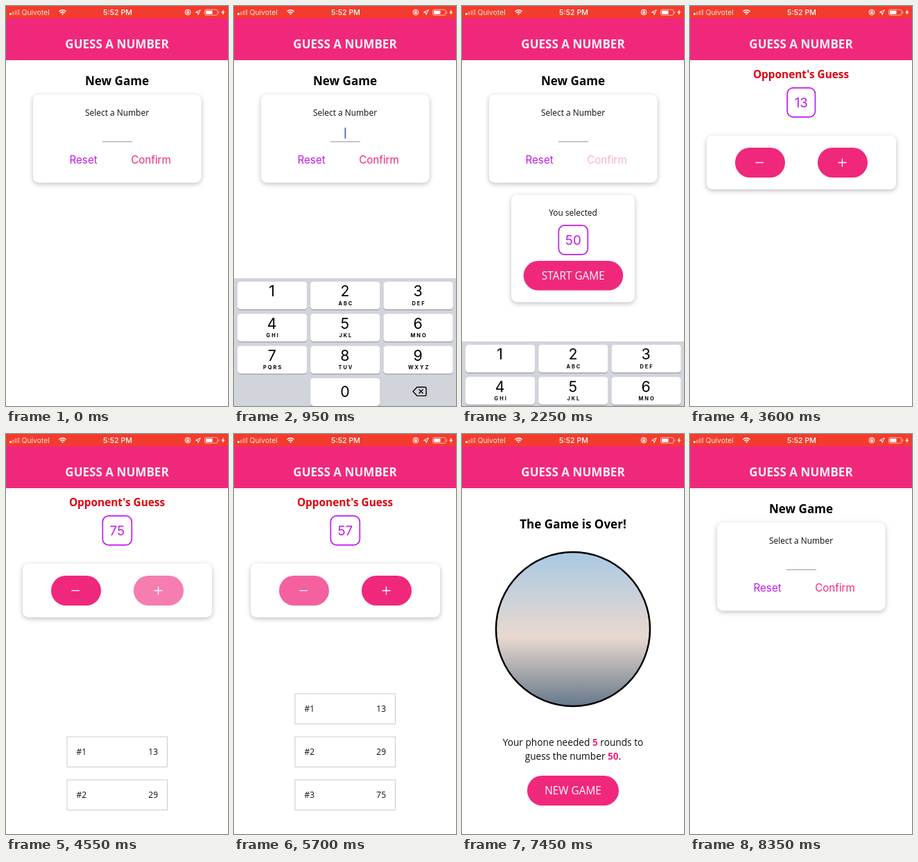
These frames come from a looping animation (320x576 px, 8.5 s). An HTML page:

```html
<!DOCTYPE html>
<html lang="en">
<head>
<meta charset="utf-8">
<title>Guess a Number</title>
<style>
  html, body { margin: 0; width: 100%; height: 100%; overflow: hidden; background: #fff; }
  svg { display: block; width: 100%; height: 100%; }
  text { font-family: "Open Sans", sans-serif; text-anchor: middle; white-space: pre; }
  .ui { font-family: Inter, Roboto, sans-serif; }
  .bold { font-weight: 700; }
  .start { text-anchor: start; }
  .end { text-anchor: end; }
  .card { fill: #fff; filter: drop-shadow(0 2px 3.5px rgba(0, 0, 0, .26)); }
  .line { fill: none; stroke: #fff; }
</style>
</head>
<body>
<svg id="stage" viewBox="0 0 320 576"></svg>
<script>
const LOOP = 8500;
const PINK = '#f0287b', PURPLE = '#c31af0', INK = '#0c0c0c';
const SMALL = 11.95, BODY = 15.36, TITLE = 17.07;
const SLIDE = 'cubic-bezier(.38,.7,.125,1)';
const FADE = 'cubic-bezier(.45,0,.55,1)';

const group = (id, content) => `<g id="${id}">${content}</g>`;
const label = (x, y, size, content, cls = '', fill = INK, extra = '') =>
  `<text x="${x}" y="${y}" font-size="${size}" class="${cls}" fill="${fill}" ${extra}>${content}</text>`;
const box = (x, y, w, h, r, attrs) =>
  `<rect x="${x}" y="${y}" width="${w}" height="${h}" rx="${r}" ${attrs}/>`;
const card = (x, y, w, h) => box(x, y, w, h, 8.5, 'class="card"');
const pill = (id, x, y, w, h, content) =>
  group(id, box(x, y, w, h, 21.3, `fill="${PINK}"`) + content);
const numberBox = (n, y, w = 42) =>
  box(160.3 - w / 2, y, w, 42, 8.5, `fill="none" stroke="${PURPLE}" stroke-width="1.7"`) +
  label(160.3, y + 28, 18.8, n, 'ui', PURPLE);

function statusBar() {
  const bars = [0, 1, 2, 3].map(i =>
    box(5 + i * 3.9, 10 - i * 1.7, 2.7, 3 + i * 1.7, .6, `fill="#fff" opacity="${i ? .4 : .9}"`)).join('');
  return box(0, 0, 320, 17.5, 0, 'fill="#f33c2d"') + bars +
    label(22.5, 13, 10.4, 'Quivotel', 'ui start', '#ffe4df') +
    label(161, 13, 10.6, '5:52 PM', 'ui', '#fff', 'font-weight="500"') +
    `<g class="line" stroke-width="1.5">
       <path d="M76.5 8Q81.5 3.6 86.5 8M78.3 10Q81.5 7.2 84.7 10"/>
       <path d="M80 11.3L81.5 13L83 11.3Q81.5 10.2 80 11.3Z" fill="#fff" stroke="none"/>
     </g>
     <g class="line" stroke-width="1">
       <circle cx="262" cy="9" r="3.9"/>
       <path d="M260.7 9V8a1.3 1.3 0 0 1 2.6 0V9"/>
       <rect x="260.3" y="8.8" width="3.4" height="2.4" fill="#fff" stroke="none"/>
       <path d="M273.4 9.2L280.3 5.6L277 12.7L276.6 9.4Z"/>
       <rect x="286.5" y="5.2" width="18.5" height="8" rx="2" stroke-opacity=".65"/>
       <rect x="288" y="6.7" width="9.5" height="5" rx=".7" fill="#fff" stroke="none"/>
       <path d="M306.7 7.7V10.7" stroke-opacity=".65"/>
       <path d="M313.8 5L310.3 9.7H312.5L311.8 13.2L315.4 8.4H313.2Z" fill="#fff" stroke="none"/>
     </g>`;
}

const header = box(0, 17, 320, 61, 0, `fill="${PINK}"`) +
  label(160, 61, TITLE, 'GUESS A NUMBER', 'bold', '#fff0f6');

const home = label(160, 113.6, TITLE, 'New Game', 'bold', '#000') +
  card(39, 127.5, 242.5, 127) +
  label(160, 157.8, SMALL, 'Select a Number') +
  box(139, 195, 43, 1, 0, 'fill="#999"') +
  group('one', label(160.3, 187.5, SMALL, '5', 'ui')) +
  group('two', label(160.3, 187.5, SMALL, '50', 'ui')) +
  group('caret', box(159.5, 175, 1.8, 16, .8, 'fill="#4a6bc8"')) +
  label(111.6, 227.2, 15.2, 'Reset', 'ui', PURPLE) +
  group('confirm', label(209, 227.2, 15.2, 'Confirm', 'ui', PINK)) +
  group('selected',
    card(71, 272, 178, 154.5) +
    label(160, 302, SMALL, 'You selected') +
    numberBox(50, 315.8) +
    pill('startGame', 88.7, 367, 143.5, 42.5, label(160.3, 393.8, BODY, 'START GAME', '', '#fff')));

const guesses = [[13, 2800, 3800], [29, 3800, 4550], [75, 4550, 5600], [57, 5600, 7000]];
const rounds = guesses.slice(0, 3);
const rowTop = i => 498 + 62 * i;

const game = label(160, 103.6, BODY, 'Opponent\'s Guess', 'bold', '#e0000f') +
  guesses.map(([n], i) => group('guess' + i, numberBox(n, 117.9, i ? 42 : 40.3))).join('') +
  card(24, 186.5, 273, 77.5) +
  pill('lower', 65, 204, 72, 43, '<path class="line" stroke-width="1.3" d="M94.5 225.5H106"/>') +
  pill('higher', 184, 204, 72, 43, '<path class="line" stroke-width="1.3" d="M213.5 225.5H225.5M219.5 219.5V231.5"/>') +
  group('list', rounds.map(([n], i) => group('row' + i,
    box(88, rowTop(i), 144.5, 43.5, 0, 'fill="#fff" stroke="#ccc"') +
    label(101.5, rowTop(i) + 26.2, SMALL, '#' + (i + 1), 'start') +
    label(219, rowTop(i) + 26.2, SMALL, n, 'end'))).join(''));

const strong = s => `<tspan class="bold" fill="${PINK}">${s}</tspan>`;
const over = label(160, 136, TITLE, 'The Game is Over!', 'bold', '#000') +
  `<linearGradient id="sky" x2="0" y2="1">
     <stop stop-color="#a9c9e4"/><stop offset=".55" stop-color="#e9d9cf"/><stop offset="1" stop-color="#66788a"/>
   </linearGradient>
   <circle cx="160" cy="281" r="111" fill="url(#sky)" stroke="#000" stroke-width="2.5"/>` +
  label(160, 449, 13.7, `Your phone needed ${strong(5)} rounds to`) +
  label(160, 469, 13.7, `guess the number ${strong(50)}.`) +
  pill('newGame', 94, 492, 132, 43, label(160, 519, BODY, 'NEW GAME', '', '#fff'));

const letters = ['', 'ABC', 'DEF', 'GHI', 'JKL', 'MNO', 'PQRS', 'TUV', 'WXYZ'];
function key(digit, col, row, caption) {
  const x = 5 + col * 105.2, y = 397 + row * 46.3, mid = x + 50.2;
  return box(x, y + 1, 100.3, 40, 4.5, 'fill="#898b90"') +
    box(x, y, 100.3, 40, 4.5, 'fill="#fff"') +
    group('press' + digit, box(x, y, 100.3, 40, 4.5, 'fill="#b4b9c3"')) +
    label(mid - .5, y + (row < 3 ? 21.3 : 27), 21.3, digit, 'ui', '#000') +
    label(mid + 1, y + 33.8, 7.4, caption, 'ui bold', '#000', 'letter-spacing="2"');
}
const keyboard = box(0, 392, 320, 200, 0, 'fill="#d1d4da"') +
  letters.map((s, i) => key(i + 1, i % 3, Math.floor(i / 3), s)).join('') + key(0, 1, 3, '') +
  `<path d="M258 555L264 548.8H275a2 2 0 0 1 2 2V559.4a2 2 0 0 1 -2 2H264ZM266.5 552L272.5 558M272.5 552L266.5 558"
     fill="none" stroke="#000" stroke-width="1.4" stroke-linejoin="round"/>`;

document.getElementById('stage').innerHTML =
  box(0, 0, 320, 576, 0, 'fill="#fff"') +
  group('home', home) + group('game', game) + group('over', over) +
  header + statusBar() + group('keyboard', keyboard);

// steps: [time, value, easing towards the next step]; a step holds by default
function track(id, prop, steps) {
  const all = [...steps, [LOOP, steps[steps.length - 1][1]]];
  document.getElementById(id).animate(
    all.map(([t, value, easing = 'step-end']) => ({ offset: t / LOOP, [prop]: value, easing })),
    { duration: LOOP, iterations: Infinity });
}
const show = (id, from, to) => track(id, 'opacity', [[0, 0], [from, 1], [to, 0]]);
const tap = (id, dim, ...times) => track(id, 'opacity', [[0, 1],
  ...times.flatMap(([down, up]) => [[down, dim], [up, dim, FADE], [up + 250, 1]])]);
const shift = (x, y) => `translate(${x}px, ${y}px)`;

track('home', 'opacity', [[0, 1], [2800, 0], [8250, 1]]);
show('game', 2800, 7000);
show('over', 7000, 8250);

track('keyboard', 'transform', [
  [0, shift(0, 190)], [560, shift(0, 190), SLIDE], [940, shift(0, 0)],
  [2170, shift(0, 0), SLIDE], [2570, shift(0, 190)]]);
letters.forEach((_, i) => i !== 4 && show('press' + (i + 1), LOOP - 2, LOOP - 1) === 0);
for (const id of ['press1', 'press2', 'press3', 'press4', 'press6', 'press7', 'press8', 'press9'])
  document.getElementById(id).remove();
show('press5', 1100, 1200);
show('press0', 1450, 1550);
show('one', 1150, 1500);
show('two', 1500, 2170);
show('caret', 900, 2170);
track('caret', 'transform', [[0, shift(0, 0)], [1150, shift(4.5, 0)], [1500, shift(8.5, 0)]]);
show('selected', 2170, 2800);

tap('confirm', .2, [2050, 2170]);
tap('startGame', .6, [2650, 2750]);
tap('higher', .6, [3700, 3800], [4450, 4550]);
tap('lower', .6, [5500, 5600], [6850, 7000]);
tap('newGame', .6, [8150, 8240]);

guesses.forEach(([, from, to], i) => show('guess' + i, from, to));
rounds.forEach(([, , added], i) => show('row' + i, added, 7000));
track('list', 'transform', [[0, shift(0, 0)], [4550, shift(0, -62)], [5600, shift(0, -124)]]);
</script>
</body>
</html>
```
